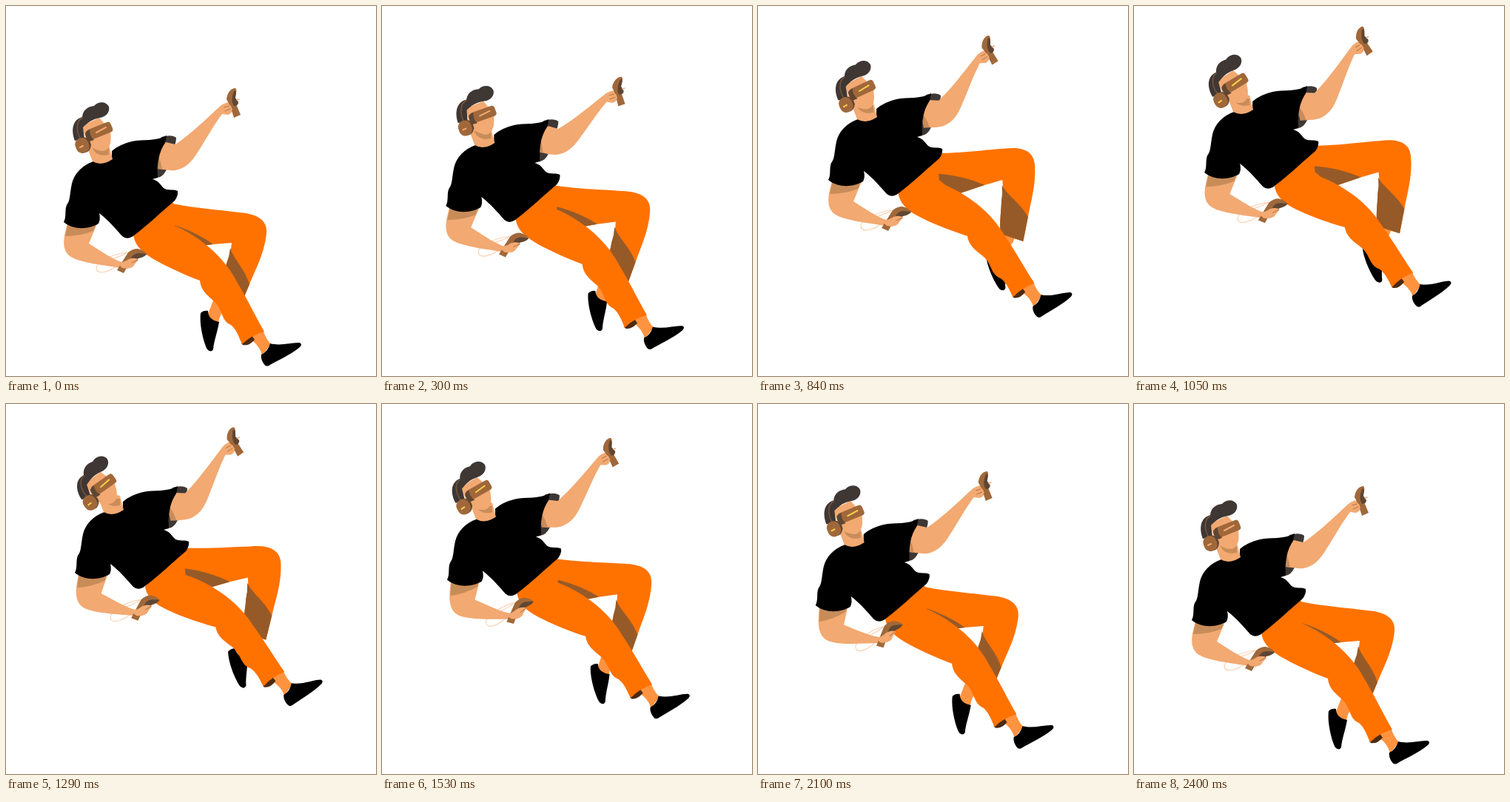
These frames come from a looping animation (500 px wide and 500 px high, 2430 ms). An HTML page:

```html
<!DOCTYPE html>
<html lang="en">
<head>
<meta charset="utf-8">
<title>Floating VR player</title>
<style>
  html, body { margin: 0; width: 100%; height: 100%; overflow: hidden; background: #fff; }
  svg { display: block; width: 100vw; height: 100vh; }
  .pants { fill: #ff7200; }
  .fold { fill: #965a28; }
  .ankle { fill: #ff9340; }
  .skin { fill: #f2a972; }
  .shade { fill: #c88c59; }
  .gear { fill: #a0683a; }
  .dark { fill: #5f4633; }
  .hair { fill: #3e3734; }
  .line { fill: none; stroke-linecap: round; stroke-linejoin: round; }
  .cord { stroke: #fbd3b4; stroke-width: 1.2; }
  .crease { stroke: #a0683a; stroke-width: .8; }
  .glow { stroke-width: 2; }
</style>
</head>
<body>
<svg viewBox="0 0 500 500">
  <g id="body">
    <g id="legB">
      <path class="ankle" d="M283 390L273 416Q275 425 287 428Q289 417 294 412L302 406L308 396Z"/>
      <path d="M263 415Q267 411 273 412Q273 424 288 427C286 440 281 452 280 464Q277 469 272 464C267 455 261 430 263 415Z"/>
      <path class="pants" d="M190 272L225 267C260 274 295 276 315 279C342 281 354 291 352 308C349 335 336 358 329 376L316 407L288 391C290 373 296 358 298 348Q304 334 305 320L280 322L240 327L198 300Z"/>
      <path class="fold" d="M213 292Q252 302 280 322L240 327Z"/>
      <path class="fold" d="M303 327C308 343 322 354 329 376L316 407L288 391C290 373 296 358 298 348Q302 338 303 327Z"/>
    </g>
    <g id="legF">
      <path class="ankle" d="M328 444L347 437Q351 450 358 457L346 472Q343 459 330 450Z"/>
      <path d="M345 471Q354 467 357 456C372 460 386 454 397 455Q401 457 397 461C385 471 367 479 355 486Q351 488 348 483Q344 477 345 471Z"/>
      <path d="M318 456L332 445L336 451Q328 460 320 458Z" fill="#4c2b12"/>
      <path class="pants" d="M172 308C174 330 196 340 212 349C230 358 248 366 262 371C263 384 272 391 281 399C294 411 290 425 304 431C312 438 315 448 319 457Q331 445 349 440C337 419 326 396 314 376C304 357 294 344 279 330C262 315 245 304 228 297L228 270L223 262Z"/>
    </g>
    <path class="hair" d="M210 177Q224 173 230 178Q230 186 225 194L217 221Q211 233 203 232Z"/>
    <g id="armR">
      <path class="skin" d="M203 190L216 184L229 187C251 172 270 153 291 134Q297 130 303 130L307 137Q306 145 300 147L292 146C280 162 271 179 260 196C251 211 243 219 229 222Q217 223 204 219Z"/>
      <path class="shade" d="M202 198Q208 203 211 221L203 220Z"/>
      <path class="gear" d="M298 126C299 116 305 111 310 111Q312 113 311 117L309 126L312 135L317 147L308 151L303 135Z"/>
      <path class="dark" d="M308 115Q311 113 311 118L310 124L314 130Q314 135 308 135Q303 128 308 115Z"/>
      <path class="skin" d="M294 134Q299 131 304 135L306 140Q304 145 298 145Z"/>
      <path class="line crease" d="M295 137L301 135M296 142L303 139"/>
      <path class="line" stroke="#f2a972" stroke-width="1.5" d="M312 127L315 126"/>
    </g>
    <g id="armL">
      <path class="line cord" d="M164 333C143 335 121 347 122 355C124 364 140 359 152 350M164 333C151 342 137 341 127 348"/>
      <path class="skin" d="M86 284C78 310 76 321 81 332Q85 340 100 344C121 350 140 351 160 355Q170 355 173 350L179 343Q175 339 168 342L156 346C142 341 128 331 112 321L124 292Z"/>
      <path class="shade" d="M85 288L80 311Q101 311 118 304L125 288Z"/>
      <path class="gear" d="M165 333Q171 328 178 328Q187 330 190 335Q188 338 178 341L168 345L159 361L150 357Z"/>
      <path class="dark" d="M169 341Q172 334 180 334L190 335Q188 339 179 341L172 345Z"/>
      <path class="skin" d="M150 347Q159 347 166 342Q175 339 179 343L175 346L172 352Q166 356 157 354Z"/>
      <path class="line crease" d="M170 347L178 343"/>
    </g>
    <path d="M118 210C103 215 92 227 89 240C86 254 87 263 82 269C79 276 82 285 78 292C91 303 112 302 125 294Q128 288 126 280C139 290 148 301 157 311Q164 317 173 310C193 295 211 277 228 263Q233 256 232 250C228 247 218 250 213 246C209 242 206 236 198 234L205 232Q203 202 215 185L217 175C203 183 185 180 170 183Q153 187 143 196L143 207Z"/>
    <path class="skin" d="M110 192L117 210Q129 217 144 207L139 188L115 182Z"/>
    <path class="shade" d="M116 191Q129 193 139 192L139 201Q126 204 119 196Z"/>
    <g id="head">
      <path class="skin" d="M102 162L126 151Q135 160 141 170C143 184 140 196 130 196Q118 195 110 186Z"/>
      <path class="hair" d="M93 182C88 169 89 154 103 150C104 140 111 136 119 135C124 129 135 128 139 136C141 144 134 150 127 151C116 153 110 158 104 164L106 180Z"/>
      <path class="line" stroke="#75543b" stroke-width="1.6" d="M103 151C94 156 95 170 101 180"/>
      <path class="dark" d="M104 177Q113 178 115 188Q114 196 108 198Z"/>
      <rect class="gear" x="94" y="178" width="18" height="21" rx="8.5" transform="rotate(-22 103 188.5)"/>
      <path class="line glow" d="M100 191L104 189"/>
      <rect class="gear" x="109" y="161.500" width="35" height="14.500" rx="4" transform="rotate(-22 126.500 168.700)"/>
      <path class="dark" d="M107 172Q108 169 113 167Q113 176 119 181L113 183Q108 180 107 172Z"/>
      <path class="line glow" d="M122 171L135 164"/>
    </g>
  </g>
</svg>
<script>
const LOOP = 2430, STEP = 30;
const times = [0, 570, 840, 1095, 1290, 1620, 1770, 2100, 2400];
const tracks = {
  x:    [0, 15, 17, 17, 15, 8, 5, -.3, 0],
  y:    [0, -41, -57, -68, -64, -50.5, -42.5, -20, 0],
  head: [0, 3.4, -3, -10, -13, -5, -1, -.5, 0],
  armR: [0, 4.7, -9.3, -11, -10.5, -5.5, -3.3, 0, 0],
  armL: [0, .5, 0, -1, -4, -10, -11.5, -10.5, 0],
  legF: [0, -.8, -3.2, -5, -5.3, -1.5, -.3, -.3, 0],
  legB: [0, -5.8, -11.5, -11.5, -8.9, -1.5, .8, 0, 0]
};
const pivots = {
  head: "140 212", armR: "215 197", armL: "100 296", legF: "205 300", legB: "170 265"
};
const $ = id => document.getElementById(id);
const glows = document.querySelectorAll(".glow");
const last = times.length - 1;

function slope(v, i) {
  const a = Math.max(i - 1, 0), b = Math.min(i + 1, last);
  return (v[b] - v[a]) / (times[b] - times[a]);
}

// Cubic Hermite curve through the key poses
function sample(v, t) {
  if (t >= times[last]) return v[last];
  let i = 0;
  while (t >= times[i + 1]) i++;
  const d = times[i + 1] - times[i], u = (t - times[i]) / d, w = 1 - u;
  return v[i] * (1 + 2 * u) * w * w + v[i + 1] * u * u * (3 - 2 * u)
    + d * u * w * (slope(v, i) * w - slope(v, i + 1) * u);
}

function draw(now) {
  const t = Math.floor((now % LOOP) / STEP) * STEP;
  const at = name => sample(tracks[name], t).toFixed(2);
  $("body").setAttribute("transform", `translate(${at("x")} ${at("y")})`);
  for (const part in pivots)
    $(part).setAttribute("transform", `rotate(${at(part)} ${pivots[part]})`);
  const color = t > 690 && t < 2250 ? "#ffcf4d" : "#f2a972";
  glows.forEach(g => g.setAttribute("stroke", color));
}

const start = performance.now();
function tick() {
  draw(performance.now() - start);
  requestAnimationFrame(tick);
}
tick();
</script>
</body>
</html>
```
